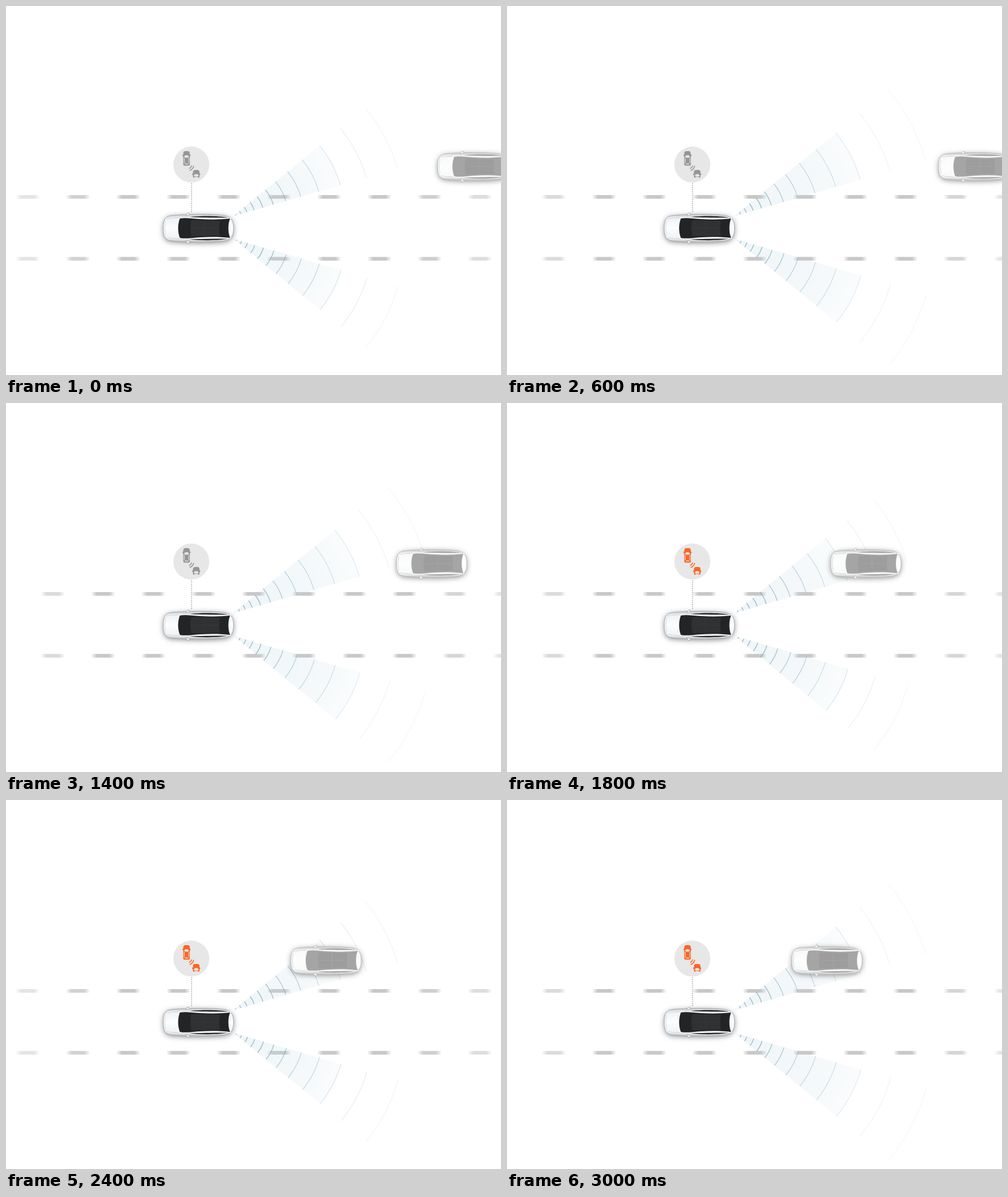
These frames come from a looping animation (867x646 px, 3.2 s). An HTML page with a canvas:

```html
<!DOCTYPE html>
<html lang="en">
<head>
<meta charset="utf-8">
<title>Blind spot sensor</title>
<style>
  html, body { margin: 0; width: 100%; height: 100%; overflow: hidden; background: #fff; }
  canvas { display: block; }
</style>
</head>
<body>
<canvas id="stage" width="867" height="646"></canvas>
<script>
const ctx = document.getElementById('stage').getContext('2d');
const STEP = 200, STEPS = 16;
const RAD = Math.PI / 180;
const clamp = (v, lo, hi) => Math.min(hi, Math.max(lo, v));

// Car outlines, nose to the left, centred on y = 0
const BODY = new Path2D('M0 0C0-13 2-20 13-22C40-25 90-25 108-22C120-19 123-13 123 0C123 13 120 19 108 22C90 25 40 25 13 22C2 20 0 13 0 0Z');
const CABIN = new Path2D('M29-17C38-19 50-17 64-16C82-15 100-15 117-17C113-8 113 8 117 17C100 15 82 15 64 16C50 17 38 19 29 17C25 7 25-7 29-17Z');
const ROOF = new Path2D('M49-14C66-14 82-13 99-13Q97 0 99 13C82 13 66 14 49 14Q46 0 49-14Z');
const WINDOW = new Path2D('M46-19.6C70-22 98-21.5 113-18.6C98-18.4 70-18.6 46-19.6Z');
const MIRROR = new Path2D('M39-22L42-26Q46-28 46-25L43-22Z');
const HOOD = new Path2D('M5-16Q14-18 27-18M5 16Q14 18 27 18M4-13Q1 0 4 13');

const DARK = { glass: '#232425', roof: '#303132', seam: '#3b3c3d', line: '#a4a7aa', hood: '#eff3f7', shadow: 'rgba(0,0,0,.45)' };
const PALE = { glass: '#a5a5a5', roof: '#9d9d9d', seam: '#a9a9a9', line: '#bcbcbc', hood: '#f9f9f9', shadow: 'rgba(0,0,0,.42)' };

function fill(path, color) {
  ctx.fillStyle = color;
  ctx.fill(path);
}

function stroke(path, color, width) {
  ctx.strokeStyle = color;
  ctx.lineWidth = width;
  ctx.stroke(path);
}

function drawCar(x, y, look) {
  ctx.save();
  ctx.translate(x, y);
  ctx.save();
  ctx.shadowColor = look.shadow;
  ctx.shadowBlur = 10;
  ctx.shadowOffsetY = 2;
  fill(BODY, '#fff');
  ctx.restore();

  const paint = ctx.createLinearGradient(0, -24, 0, 24);
  paint.addColorStop(0, '#c9cbcd');
  paint.addColorStop(.14, look.hood);
  paint.addColorStop(.5, '#fcfdfd');
  paint.addColorStop(.86, look.hood);
  paint.addColorStop(1, '#c6c8ca');
  fill(BODY, paint);
  stroke(BODY, look.line, 1);
  stroke(HOOD, '#d3d9df', 1);

  for (const side of [1, -1]) {
    ctx.save();
    ctx.scale(1, side);
    fill(WINDOW, look.glass);
    fill(MIRROR, '#f4f4f4');
    stroke(MIRROR, look.line, 1);
    ctx.restore();
  }
  stroke(CABIN, '#f6f7f7', 2.4);
  fill(CABIN, look.glass);
  fill(ROOF, look.roof);
  stroke(new Path2D('M49 0H96M72-13V13M92-2V3'), look.seam, .7);
  ctx.restore();
}

function drawLanes(k) {
  for (let x = k % 2 ? 62 : 18; x < 867; x += 88) {
    const alpha = clamp(Math.min(.42 + x / 260, .44 + (867 - x) / 330), 0, 1);
    const g = ctx.createLinearGradient(x, 0, x + 40, 0);
    const tone = a => `rgba(186,186,186,${a * alpha})`;
    g.addColorStop(0, tone(.12));
    g.addColorStop(.22, tone(.8));
    g.addColorStop(.78, tone(.8));
    g.addColorStop(1, tone(.12));
    ctx.fillStyle = g;
    for (const y of [331, 439.3]) ctx.fillRect(x, y, 40, 6.4);
  }
}

// Each ring grows along this curve; one unit separates neighbouring rings
const radius = s => 95 * 1.2 ** s - 41;

function drawBeam(x, y, flip, phase) {
  const from = -39.3 * RAD, to = -16.1 * RAD;
  ctx.save();
  ctx.translate(x, y);
  ctx.scale(1, flip);
  const edge = radius(5 + phase);
  const g = ctx.createRadialGradient(0, 0, 0, 0, 0, edge);
  g.addColorStop(0, 'rgba(190,214,224,.24)');
  g.addColorStop(.6, 'rgba(190,214,224,.18)');
  g.addColorStop(1, 'rgba(190,214,224,.08)');
  ctx.fillStyle = g;
  ctx.beginPath();
  ctx.moveTo(0, 0);
  ctx.arc(0, 0, edge, from, to);
  ctx.fill();

  for (let n = -4; n <= 7; n++) {
    const s = n + phase;
    const alpha = clamp(.66 - Math.max(0, s) * .072, .12, .66);
    ctx.strokeStyle = `rgba(112,162,180,${alpha})`;
    ctx.lineWidth = clamp(1.5 - s * .08, .9, 1.5);
    ctx.beginPath();
    ctx.arc(0, 0, radius(s), from, to);
    ctx.stroke();
  }
  ctx.restore();
}

function box(x, y, w, h, r) {
  ctx.beginPath();
  ctx.roundRect(x, y, w, h, r);
  ctx.fill();
}

// Front half of a car icon: bonnet, mirrors, windscreen and pillars
function drawIcon(x, y, length, ink, back) {
  ctx.save();
  ctx.translate(x, y);
  ctx.fillStyle = ink;
  box(-5.7, 0, 11.4, length, [4, 4, 2, 2]);
  box(-7.2, 6.3, 14.4, 2.6, 1.2);
  fill(new Path2D('M-4 8.6Q0 6 4 8.6L3.2 11.4H-3.2Z'), back);
  ctx.restore();
}

function drawBadge(alert) {
  const ink = alert ? '#fb6625' : '#969696', back = '#e7e7e7';
  ctx.fillStyle = '#b0b0b0';
  for (let y = 310; y < 360; y += 3.5) ctx.fillRect(324.3, y, 1.5, 2);

  ctx.fillStyle = back;
  ctx.beginPath();
  ctx.arc(324.6, 277.6, 31.5, 0, 7);
  ctx.fill();

  drawIcon(316.2, 254, 25.5, ink, back);
  ctx.fillRect(311.8, 266, 1, 9);
  ctx.fillRect(319.6, 266, 1, 9);
  ctx.fillRect(313.2, 275.8, 6, 1.4);

  drawIcon(333.2, 287, 13.8, ink, back);
  ctx.fillRect(330, 299.4, 6.4, 1.6);

  ctx.strokeStyle = ink;
  ctx.lineWidth = 1.6;
  for (const r of [6.7, 10.4]) {
    ctx.beginPath();
    ctx.arc(318.5, 278, r, 10 * RAD, 72 * RAD);
    ctx.stroke();
  }
}

// The passing car waits, glides forward, then keeps pace
function passingX(k) {
  if (k <= 5) return 756;
  const u = clamp((k - 4.64) / 6.65, 0, 1);
  return 756 - 257 * (1 - Math.cos(Math.PI * u)) / 2;
}

function draw() {
  const k = Math.floor(performance.now() / STEP) % STEPS;
  const phase = k % 4 / 4;
  ctx.fillStyle = '#fff';
  ctx.fillRect(0, 0, 867, 646);
  drawLanes(k);
  drawBeam(398, 368, 1, phase);
  drawBeam(399, 408, -1, phase);
  drawBadge(k >= 8);
  drawCar(275.5, 389, DARK);
  drawCar(passingX(k), 281, PALE);
  requestAnimationFrame(draw);
}
draw();
</script>
</body>
</html>
```
